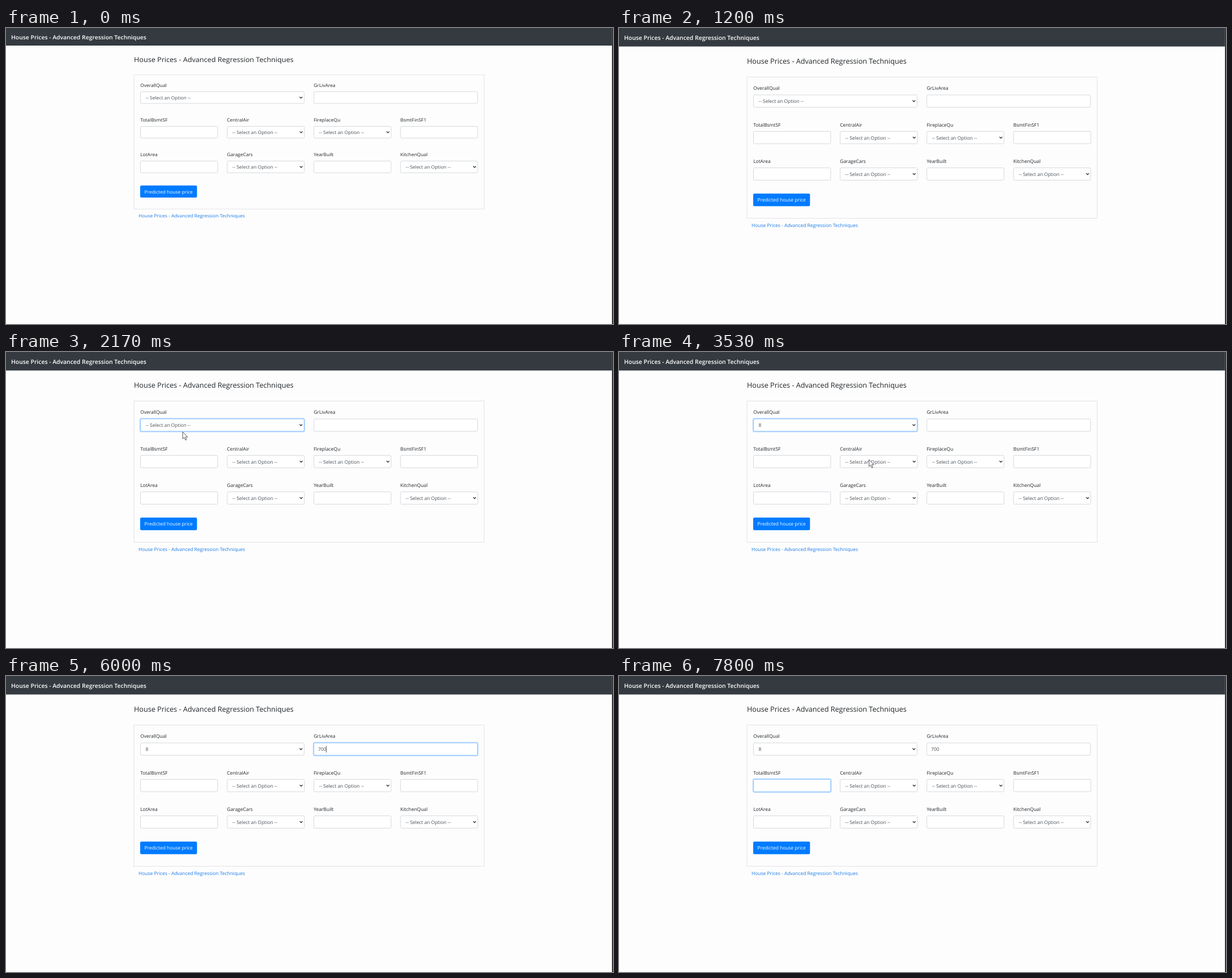
An HTML page for the animation above (8000 ms loop, 1072 by 522 pixels).

```html
<!DOCTYPE html>
<html lang="en">
<head>
<meta charset="utf-8">
<title>House Prices</title>
<style>
  html, body { margin: 0; width: 100%; height: 100%; overflow: hidden; background: #fdfdfd; }
  svg { display: block; }
  text { font: 8.43px "Open Sans", "Noto Sans", sans-serif; fill: #212529; text-rendering: geometricPrecision; white-space: pre; }
  .brand { font-size: 10.4px; font-weight: 600; fill: #fff; }
  .title { font-size: 12.63px; }
  .value { fill: #495057; }
  .link { fill: #1a7ae8; }
  .button { fill: #fff; }
</style>
</head>
<body>
<svg id="stage" width="1072" height="522" viewBox="0 0 1072 522"></svg>
<script>
const LOOP = 8000;
const TITLE = "House Prices - Advanced Regression Techniques";
const HINT = "-- Select an Option --";
const stage = document.getElementById("stage");

function add(parent, tag, attrs, content) {
  const el = document.createElementNS("http://www.w3.org/2000/svg", tag);
  for (const key in attrs) el.setAttribute(key, attrs[key]);
  if (content) el.textContent = content;
  parent.appendChild(el);
  return el;
}

const box = (parent, x, y, width, height, attrs) =>
  add(parent, "rect", { x, y, width, height, ...attrs });
const label = (parent, x, y, str, cls = "") =>
  add(parent, "text", { x, y, class: cls }, str);

box(stage, 0, 0, 1072, 522, { fill: "#fdfdfd" });
const page = add(stage, "g", {});
box(page, 0, 0, 1070, 32.6, { fill: "#343a40" });
label(page, 9, 20.6, TITLE, "brand");
label(page, 226, 63, TITLE, "title");
box(page, 226, 86.5, 618.5, 249, { fill: "none", stroke: "#e3e3ec" });

function field(name, col, row, isSelect, wide) {
  const x = 237.5 + col * 153.1, y = 118 + row * 64.3;
  const w = wide ? 289 : 136.3, h = 21.8;
  label(page, x - 0.3, y - 8.7, name);
  const glow = box(page, x - 0.9, y - 0.9, w + 1.8, h + 1.8,
    { rx: 3, fill: "none", stroke: "#007bff", "stroke-width": 1.8, "stroke-opacity": 0 });
  const frame = box(page, x, y, w, h, { rx: 2.2, fill: "#fff", stroke: "#ced4da", "stroke-width": 0.9 });
  const value = label(page, x + (isSelect ? 9 : 7.5), y + 14.2, isSelect ? HINT : "", "value");
  if (isSelect) {
    add(page, "path", {
      d: `M${x + w - 8} ${y + 9.6}l2.4 2.4l2.4 -2.4`,
      fill: "none", stroke: "#343a40", "stroke-width": 1.4
    });
  }
  const caret = box(page, x + 7.3, y + 5, 0.8, 12, { fill: "#333", visibility: "hidden" });
  return { x, glow, frame, value, caret };
}

const quality = field("OverallQual", 0, 0, true, true);
const living = field("GrLivArea", 2, 0, false, true);
const basement = field("TotalBsmtSF", 0, 1);
field("CentralAir", 1, 1, true);
field("FireplaceQu", 2, 1, true);
field("BsmtFinSF1", 3, 1);
field("LotArea", 0, 2);
field("GarageCars", 1, 2, true);
field("YearBuilt", 2, 2);
field("KitchenQual", 3, 2, true);

box(page, 237, 292, 100.3, 22.3, { rx: 2.2, fill: "#007bff" });
label(page, 244.6, 306.4, "Predicted house price", "button");
label(page, 234, 351.2, TITLE, "link");
box(stage, 1070.3, 0, 1.7, 522, { fill: "#16181a" });

const pointer = add(stage, "path", {
  d: "M0 0V12.2L2.8 9.6L4.9 14.4L6.9 13.5L4.9 8.9H8.6Z",
  fill: "#fff", stroke: "#444", "stroke-width": 0.9, "stroke-linejoin": "round"
});

// Pointer trips as [time, x, y]; over text inputs the arrow is hidden.
const trips = [
  [[1270, 440, 6], [1570, 350, 98], [1770, 322, 131], [1900, 312, 139], [2170, 312, 141], [3000, 312, 141]],
  [[3230, 340, 234], [3330, 372, 222], [3470, 405, 207], [3530, 441, 190], [3730, 541, 150]],
  [[6300, 585, 142], [6500, 455, 166], [6700, 377, 181]]
];

const clamp = v => Math.max(0, Math.min(1, v));
const ease = v => { v = clamp(v); return v * v * (3 - 2 * v); };
const within = (t, a, b) => t >= a && t < b;

// Focus ring fades over 150 ms both ways.
const focus = (t, start, end) => ease((t - start) / 150) - ease((t - end) / 150);

function setFocus(f, k) {
  const mix = (a, b) => Math.round(a + (b - a) * k);
  f.glow.setAttribute("stroke-opacity", 0.25 * k);
  f.frame.setAttribute("stroke", `rgb(${mix(206, 128)},${mix(212, 189)},${mix(218, 255)})`);
}

function setText(f, str) {
  if (f.value.textContent !== str) f.value.textContent = str;
}

function setCaret(f, on) {
  const w = f.value.textContent ? f.value.getComputedTextLength() : 0;
  f.caret.setAttribute("x", f.x + 7.3 + w);
  f.caret.setAttribute("visibility", on ? "visible" : "hidden");
}

function movePointer(t) {
  const trip = trips.find(p => within(t, p[0][0], p[p.length - 1][0]));
  pointer.setAttribute("visibility", trip ? "visible" : "hidden");
  if (!trip) return;
  const i = trip.findIndex(p => p[0] > t);
  const [t0, x0, y0] = trip[i - 1], [t1, x1, y1] = trip[i];
  const k = (t - t0) / (t1 - t0);
  pointer.setAttribute("transform", `translate(${x0 + (x1 - x0) * k} ${y0 + (y1 - y0) * k})`);
}

function draw(t) {
  page.setAttribute("transform", `scale(1 ${t < 430 ? 0.9515 : 1})`);
  setFocus(quality, focus(t, 2000, 4350));
  setFocus(living, focus(t, 4350, 7250));
  setFocus(basement, focus(t, 7250, LOOP + 150));
  setText(quality, t < 3230 ? HINT : "8");
  setText(living, "700".slice(0, [5270, 5400, 5570].filter(k => t >= k).length));
  setCaret(living, within(t, 4320, 4830) || within(t, 5270, 6100) || within(t, 6630, 7170));
  setCaret(basement, within(t, 7270, 7800));
  movePointer(t);
}

function tick() {
  draw(performance.now() % LOOP);
  requestAnimationFrame(tick);
}
tick();
</script>
</body>
</html>
```
